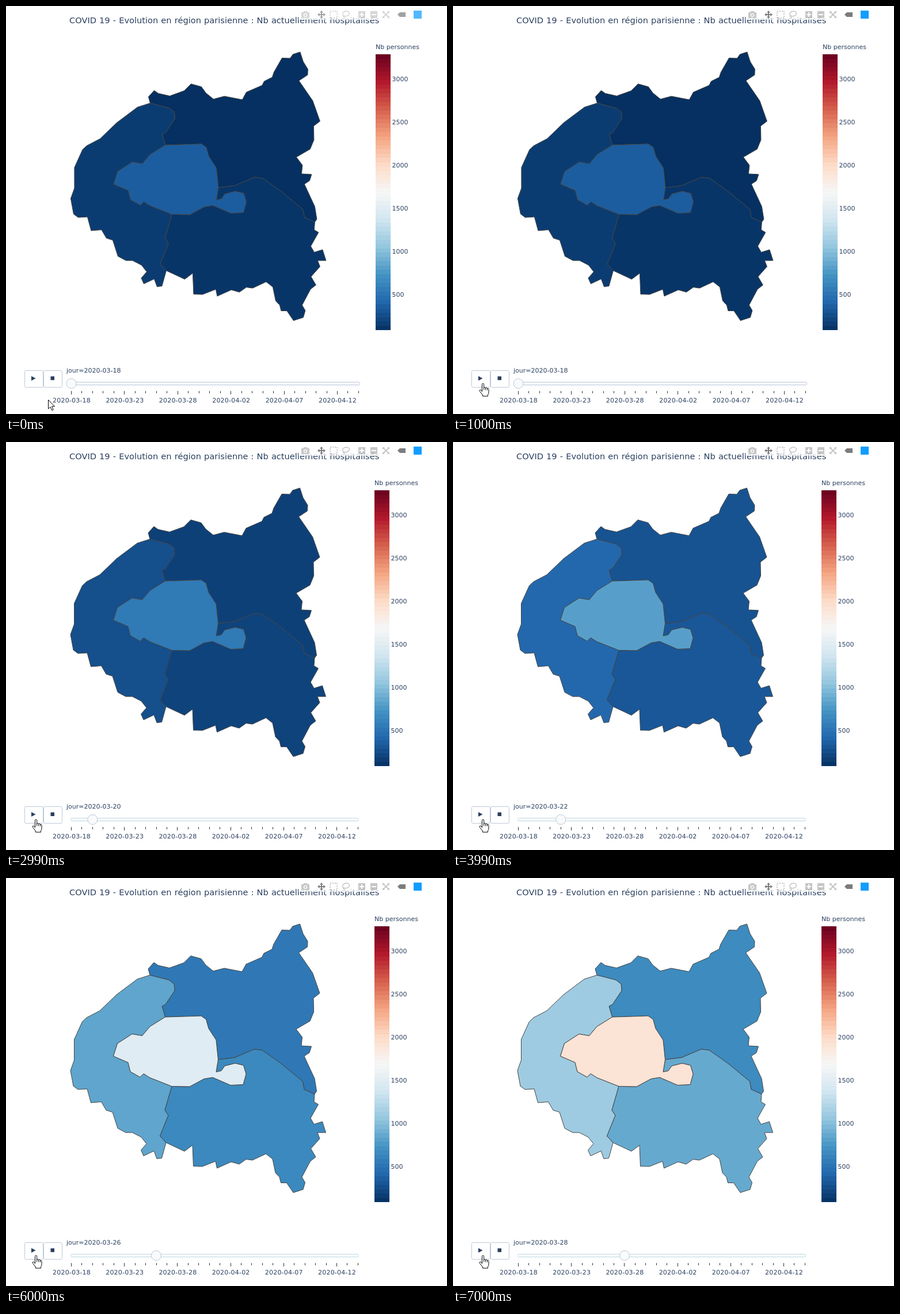
An HTML page for the animation above (8 s loop, 766 px wide and 710 px high).

```html
<!DOCTYPE html>
<html lang="fr">
<head>
<meta charset="utf-8">
<style>
html, body { margin: 0; width: 100%; height: 100%; overflow: hidden; background: #fff; }
svg { display: block; }
text { font: 11px "DejaVu Sans", Verdana, sans-serif; fill: #2a3f5f; white-space: pre; }
#title { font-size: 14.6px; word-spacing: .034em; }
.day { text-anchor: middle; letter-spacing: .2px; }
#map path { stroke: #444; }
.box { fill: #fff; stroke: #bec8d9; }
.dark { fill: #2a3f5f; }
.tick { stroke: #333; shape-rendering: crispEdges; }
.off { fill: #444; opacity: .3; }
.on { fill: #444; opacity: .7; }
.line { fill: none; stroke: #444; stroke-width: 1.5; }
.dash { fill: none; stroke: #444; stroke-width: 2; stroke-dasharray: 2; }
.cursor { fill: #fff; stroke: #000; stroke-linejoin: round; }
</style>
</head>
<body>
<svg width="766" height="710" viewBox="0 0 766 710">
  <rect width="766" height="710" fill="#fff"/>
  <text id="title" x="110" y="30">COVID 19 - Evolution en région parisienne : Nb actuellement hospitalisés</text>
  <rect x="508" y="4" width="220" height="20" fill="#fff" opacity=".72"/>
  <g id="bar">
    <path class="off" fill-rule="evenodd" d="M513 11h3l1.500-2h5l1.500 2h3v10h-14zM520 12.500a3.300 3.300 0 1 0 .01 0zM520 14a1.800 1.800 0 1 1-.01 0z"/>
    <path class="on" d="M548 8l3 3.500h-2v2.500h2.500v-2l3.500 3-3.500 3v-2h-2.500v2.500h2l-3 3.500-3-3.500h2v-2.500h-2.500v2l-3.500-3 3.500-3v2h2.500v-2.500h-2z"/>
    <g class="off">
      <rect class="dash" x="563" y="9" width="12" height="12"/>
      <ellipse class="line" cx="590.500" cy="13.500" rx="6" ry="4.200" transform="rotate(-12 590 13)"/>
      <path class="line" d="M586 16q-1 2 1 3t0 3"/>
      <path fill-rule="evenodd" d="M612 9h12v12h-12zM617 11v3h-3v2h3v3h2v-3h3v-2h-3v-3zM633 9h12v12h-12zM635 14v2h8v-2z"/>
      <path d="M654 9h4l-1.300 1.300 3.300 3.300 3.300-3.300L662 9h4v4l-1.300-1.300-3.300 3.300 3.300 3.300L666 17v4h-4l1.300-1.300-3.300-3.300-3.300 3.300L658 21h-4v-4l1.300 1.300 3.300-3.300-3.300-3.300L654 13z"/>
    </g>
    <path class="on" d="M680 15l4-4h10v8h-10z"/>
    <rect x="708" y="8" width="14" height="14" fill="#119dff"/>
  </g>
  <g id="map"></g>
  <g id="scale"><text y="75">Nb personnes</text></g>
  <rect class="box" x="32.500" y="634.500" width="32" height="29" rx="2"/>
  <rect class="box" x="65.500" y="634.500" width="32" height="29" rx="2"/>
  <path class="dark" d="M44 644l7.500 4-7.500 4zM77.500 644.500h6.500v6.500h-6.500z"/>
  <text id="label" x="105" y="638"></text>
  <rect id="rail" x="112.500" y="654.500" height="5" rx="2" fill="#f8fafc"/>
  <g id="ticks"></g>
  <circle id="grip" cy="657" r="8.500" fill="#f8fafc" stroke="#bec8d9"/>
  <path id="arrow" class="cursor" d="M73.500 685.500v15.500l3.500-3.300 2.700 6 2.500-1.200-2.600-5.700h4.900z"/>
  <path id="hand" class="cursor" d="M50.500 669V658.500a1.600 1.600 0 0 1 3.200 0V664q1.700-1.200 3 .5 1.800-.7 2.800.8 2.500-.3 2.500 2V672q0 2.500-1.500 4.500V679H51.500V677L46.500 670.500q-1-1.800.4-2.400 1.500-.4 2.600 1.200L50.500 671zM53.700 664v4M56.700 665v3.500M59.500 665.500v3"/>
</svg>
<script>
const $ = id => document.getElementById(id);
const set = (el, attrs) => { for (const k in attrs) el.setAttribute(k, attrs[k]); };
function add(parent, tag, attrs, text) {
  const el = document.createElementNS("http://www.w3.org/2000/svg", tag);
  set(el, attrs);
  if (text) el.textContent = text;
  return parent.appendChild(el);
}

// Borders, each given once and shared by neighbouring areas
const border = s => s.split(" ");
const back = b => [...b].reverse();
const north = border("250,169 247,158 257,147 264,152 284,156.5 309,147.5 321,135.5 339,140.5 347,151.5 360,162 379,157 410,163 417,150 444.5,138 448,131 462,124 465,115 479,90.5 493,91 498,84 510.5,80 516,97 524,110 523.5,120 508.5,130 532.5,165 545,200.5 534,209 534.5,233 528,249 504,263 514.5,277 513,292 530.5,293 527,304 518,310 536,349 539.5,371 536,376");
const east = border("536,376 518,368 515.5,354 478,323 445,299.5 431,298 397,312.5 368.5,316");
const crest = border("368.5,316 365,282 352,262 347.5,246 339,240 276.5,242");
const link = border("276.5,242 271,223 277,220 293,196 292,184.5 283,177.5 250,169");
const west = border("250,169 228,176 192,203 163,231 140,243 132.5,250 118.5,281 118.5,317 112,335 117,362 125,368 141,367 147.5,391 165.5,389.5 174,404 185,407.5 194,435.5 208,443 219.5,443 235,451 244,462.5 234.5,473.5 239,483.5 257,475 262,488.5 270.5,487.5 278,460.5");
const split = border("278,460.5 267.5,449 282,413 276,404 288,362.5");
const left = border("288,362.5 250,347.5 239,340.5 233,346.5 216,337 212,321 186.5,310 193.5,288 219,271.5 236.5,274.5 250,258.5 276.5,242");
const low = border("368.5,316 365,337.5 374,335.5 380,327 398,322.5 412.5,326 417,341 412,359.5 390,360.5 359,347 344,349.5 319,363 288,362.5");
const south = border("278,460.5 310,475.5 324,465 325.5,501.5 341,502 364,493 366.5,505 391,494 405,498 417,489.5 428,491 451.5,480 463,489 468,513 475,520.5 477.5,530.5 487.5,530.5 499,547.5 516,542 519.5,530 514,520.5 528.5,493 538,485.5 529.5,471 545,453.5 541,443 555.5,443 549.5,424 535,428.5 529,418 542.5,394 535,389.5 536,376");

// Each area: outline, first count, linear and quadratic growth per step
const areas = [
  [[...north, ...east, ...crest, ...link], 91, 92, 5],
  [[...west, ...split, ...left, ...link], 160, 95, 19],
  [[...south, ...east, ...low, ...back(split)], 120, 70, 16],
  [[...low, ...left, ...back(crest)], 355, 171, 28]
].map(([points, base, rate, bend]) => ({
  path: add($("map"), "path", { d: "M" + points.join("L") + "Z" }),
  count: n => base + rate * n + bend * n * n
}));

// Diverging blue to red scale
const MIN = 91, MAX = 3283, TOP = 84, TALL = 480, BANDS = 64;
const stops = ["053061", "2166ac", "4393c3", "92c5de", "d1e5f0", "f7f7f7",
  "fddbc7", "f4a582", "d6604d", "b2182b", "67001f"]
  .map(h => [0, 2, 4].map(i => parseInt(h.slice(i, i + 2), 16)));
function shade(u) {
  const x = u * 10, i = Math.min(9, Math.floor(x));
  return `rgb(${stops[i].map((c, k) => Math.round(c + (stops[i + 1][k] - c) * (x - i)))})`;
}
const part = v => (v - MIN) / (MAX - MIN);

for (let i = 0; i < BANDS; i++) {
  const edge = n => Math.round(TOP + n * TALL / BANDS);
  add($("scale"), "rect", {
    y: edge(i), width: 26, height: edge(i + 1) - edge(i), fill: shade(1 - (i + .5) / BANDS)
  });
}
for (let v = 500; v <= 3000; v += 500)
  add($("scale"), "text", { x: 28.5, y: TOP + TALL * (1 - part(v)) + 4 }, String(v));

const date = n => new Date(Date.UTC(2020, 2, 18 + n)).toISOString().slice(0, 10);
const ticks = Array.from({ length: 28 }, (_, n) => {
  const major = n % 5 === 0;
  return {
    line: add($("ticks"), "line", { class: "tick", y1: 670, y2: major ? 676 : 674 }),
    text: major && add($("ticks"), "text", { class: "day", y: 690 }, date(n))
  };
});

function draw(t) {
  const beat = Math.floor((t + 10) / 1000);      // the picture jumps once a second
  const n = Math.max(0, beat - 2), day = 2 * n;  // playback starts after the click
  const inset = Math.min(2, Math.max(0, beat - 1)); // layout narrows pixel by pixel
  const x = 642 - inset, step = 18.48 - .02 * inset;

  for (const a of areas) set(a.path, { fill: shade(part(a.count(n))) });
  set($("map"), { transform: `translate(${inset ? 0 : .4})` });
  set($("scale"), { transform: `translate(${x})` });
  set($("bar"), { opacity: beat ? 1 : .72 });
  set($("arrow"), { visibility: beat ? "hidden" : "visible" });
  set($("hand"), { visibility: beat ? "visible" : "hidden" });
  $("label").textContent = "jour=" + date(day);
  set($("rail"), { width: x - 140, stroke: n ? "#c3dbe6" : "#bec8d9" });
  set($("grip"), { cx: 113.5 + day * step });
  ticks.forEach(({ line, text }, i) => {
    const tx = 113.5 + i * step, px = Math.floor(tx) + .5;
    set(line, { x1: px, x2: px });
    if (text) set(text, { x: tx + .5 });
  });
}

const start = performance.now();
function loop() {
  draw((performance.now() - start) % 8000);
  requestAnimationFrame(loop);
}
loop();
</script>
</body>
</html>
```
